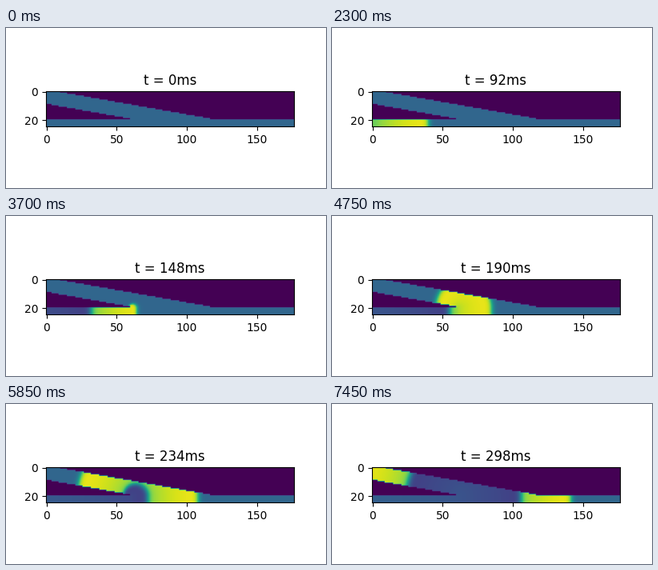
Recreate the animation shown at these times as a matplotlib script. Size 400 by 200 pixels, loop 7.5 s.

```python
import numpy as np
import matplotlib.pyplot as plt
from matplotlib.animation import FuncAnimation

ROWS, COLS = 25, 177
FRAMES, INTERVAL, STEP_MS = 150, 50, 2
CABLE_TOP, FORK = 20, 60
ONSET, SPEED = 16, 0.525  # ms, columns per ms
DELAY_AHEAD, DELAY_BACK, DELAY_REACH = 12, 31, 3
REST, PEAK = 0.33, 0.97

row, col = np.mgrid[:ROWS, :COLS].astype(float)

# Tissue: a straight cable joined by a branch tilted by 10 degrees
offset = row - col * np.tan(np.radians(10))
cable = row >= CABLE_TOP
tissue = cable | ((offset > -1.62) & (offset < 8.44))


def arrival_times():
    """Time in ms at which the wave front reaches each cell."""
    dx = col - FORK
    dy = np.minimum(row - CABLE_TOP, 0)
    dist = np.hypot(dx, dy)
    inlet = np.maximum(ONSET + col / SPEED, 20)
    # The front slows down as it turns around the fork
    forward = 0.5 * (1 + dx / np.maximum(dist, 1e-9))
    delay = DELAY_AHEAD * forward + DELAY_BACK * (1 - forward)
    delay *= 1 - np.exp(-dist / DELAY_REACH)
    beyond = ONSET + (FORK + dist) / SPEED + delay
    return np.where(cable & (col <= FORK), inlet, beyond)


def sigmoid(x):
    return 0.5 * (1 + np.tanh(x / 2))


arrival = arrival_times()
duration = 68.5 + 11 * np.exp(-(arrival - 20) / 48)


def potential(t):
    tau = t - arrival
    plateau = PEAK - 0.14 * (np.clip(tau, 0, duration) / 65) ** 2
    excited = REST + (plateau - REST) * sigmoid(tau / 2)
    recovery = REST - 0.15 * np.exp(-np.maximum(tau - duration, 0) / 120)
    fall = sigmoid((tau - duration) / 2.2)
    return np.where(tissue, excited * (1 - fall) + recovery * fall, 0)


fig, ax = plt.subplots(figsize=(4, 2), dpi=100)
image = ax.imshow(potential(0), cmap="viridis", vmin=0, vmax=1)
title = ax.set_title("t = 0ms")


def update(i):
    t = i * STEP_MS
    image.set_data(potential(t))
    title.set_text(f"t = {t}ms")
    return image, title


anim = FuncAnimation(fig, update, frames=FRAMES, interval=INTERVAL,
                     repeat=True, repeat_delay=0)
plt.show()
```
